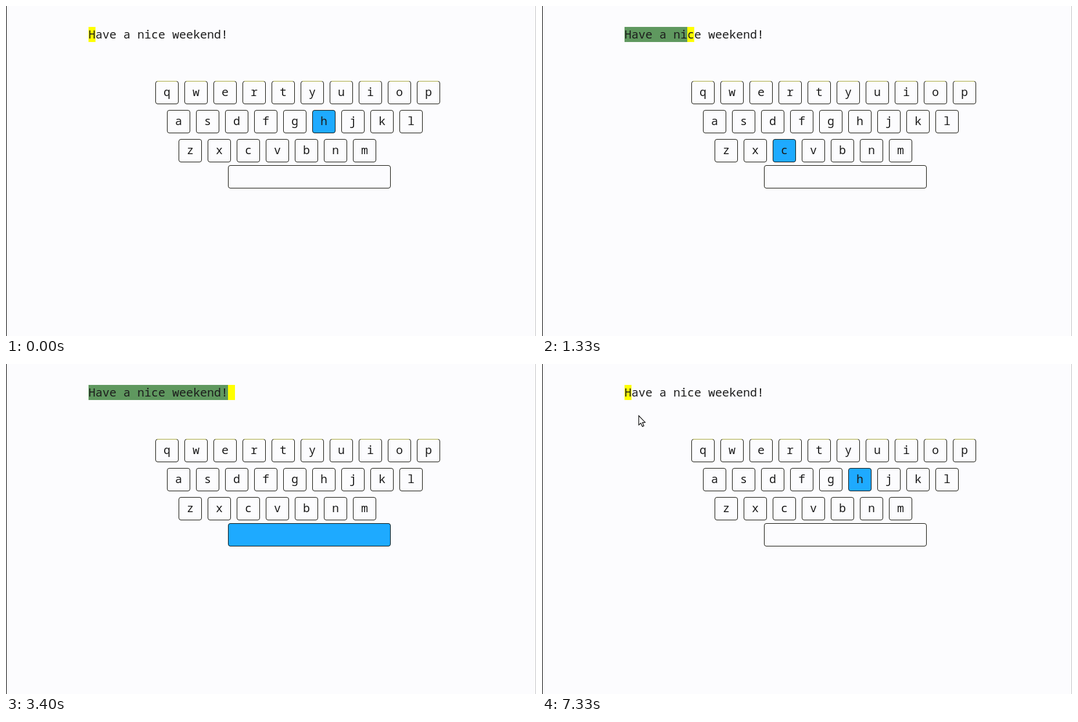
Animation of 912x568 px, one loop 7390 ms. Source, as an HTML page with a canvas:

```html
<!DOCTYPE html>
<html lang="en">
<head>
<meta charset="utf-8">
<title>Typing practice</title>
<style>
  html, body { margin: 0; width: 100%; height: 100%; overflow: hidden; background: #fcfcfe; }
  canvas { display: block; width: 912px; height: 568px; }
</style>
</head>
<body>
<canvas id="stage" width="912" height="568"></canvas>
<script>
const ctx = document.getElementById('stage').getContext('2d');
const LOOP = 7390;
const TICK = 1000 / 15;
const PHRASE = 'Have a nice weekend!';
const CELL = 12;
const LEFT = 142;

// Time at which each character of the phrase is typed.
const STROKES = [70, 200, 400, 600, 730, 800, 930, 1130, 1330, 1530,
  1600, 1800, 1800, 2000, 2130, 2270, 2400, 2530, 2600, 3400];
const RESULT_AT = 4670;
const RESTART_AT = 7270;
const POINTER_AT = 6730;

const ROWS = ['qwertyuiop', 'asdfghjkl', 'zxcvbnm'];
const INK = '#1c1c1c';
const BLUE = '#1eaaff';

function box(x, y, w, h, color) {
  ctx.fillStyle = color;
  ctx.fillRect(x, y, w, h);
}

function write(text, x, y, size = 20, align = 'left', color = INK) {
  ctx.font = `${size}px "Noto Sans Mono", "DejaVu Sans Mono", monospace`;
  ctx.textAlign = align;
  ctx.fillStyle = color;
  ctx.fillText(text, x, y);
}

function drawKey(label, x, y, w, lit, topEdge) {
  ctx.beginPath();
  ctx.roundRect(x + 0.5, y + 0.5, w - 1, 39, 3.5);
  if (lit) {
    ctx.fillStyle = BLUE;
    ctx.fill();
  }
  ctx.lineWidth = 1;
  ctx.strokeStyle = '#101008';
  ctx.stroke();
  if (topEdge) box(x + 3, y, w - 6, 1, topEdge);
  write(label, x + w / 2, y + 26, 20, 'center');
}

function drawKeyboard(top, active, edge) {
  ROWS.forEach((row, r) => {
    [...row].forEach((ch, i) => {
      drawKey(ch, 257 + r * 20 + i * 50, top + r * 50, 40, ch === active, r === 0 && edge);
    });
  });
  drawKey('', 382, top + 145, 280, active === ' ');
}

function drawPhrase(count) {
  const caret = LEFT + count * CELL;
  box(LEFT, 36, count * CELL, 26, '#5f985f');
  box(caret, 36, CELL, 26, '#ffff00');
  [...PHRASE].forEach((ch, i) => write(ch, LEFT + i * CELL, 56));
}

function drawResult() {
  write('Speed : 60WPM', LEFT, 60, 28);
  box(142, 75, 88, 34, '#101010');
  box(142, 75, 87, 33, '#77774a');
  box(144, 77, 84, 30, '#efeff5');
  write('Restart', 144, 99, 20, 'left', '#000');
}

function drawPointer(t) {
  const steps = Math.floor((t - POINTER_AT + 4) / TICK);
  const p = Math.min(1, steps / 5);
  const ease = 1 - (1 - p) ** 2;
  const shape = [[0, 0], [0, 16], [3.6, 12.8], [6.2, 18.6], [8.8, 17.4], [6.3, 11.8], [11, 11.4]];
  ctx.save();
  ctx.translate(11.5 + 155 * ease, 62 + 27 * ease);
  ctx.beginPath();
  shape.forEach(([x, y]) => ctx.lineTo(x, y));
  ctx.closePath();
  ctx.fillStyle = '#fff';
  ctx.fill();
  ctx.lineWidth = 1.2;
  ctx.strokeStyle = '#111';
  ctx.stroke();
  ctx.restore();
}

function draw(t) {
  box(0, 0, 912, 568, '#fcfcfe');
  box(0, 0, 1, 568, '#000');
  box(911, 0, 1, 568, '#c4c4c6');

  if (t >= RESULT_AT && t < RESTART_AT) {
    drawResult();
    drawKeyboard(174, ' ', '#ffff00');
  } else {
    const count = t < RESTART_AT ? STROKES.filter(s => s <= t).length : 0;
    drawPhrase(count);
    drawKeyboard(129, (PHRASE[count] || ' ').toLowerCase(), '#a8a83c');
  }
  if (t >= POINTER_AT) drawPointer(t);
}

const start = performance.now();
function loop() {
  draw((performance.now() - start) % LOOP);
  requestAnimationFrame(loop);
}
loop();
</script>
</body>
</html>
```
